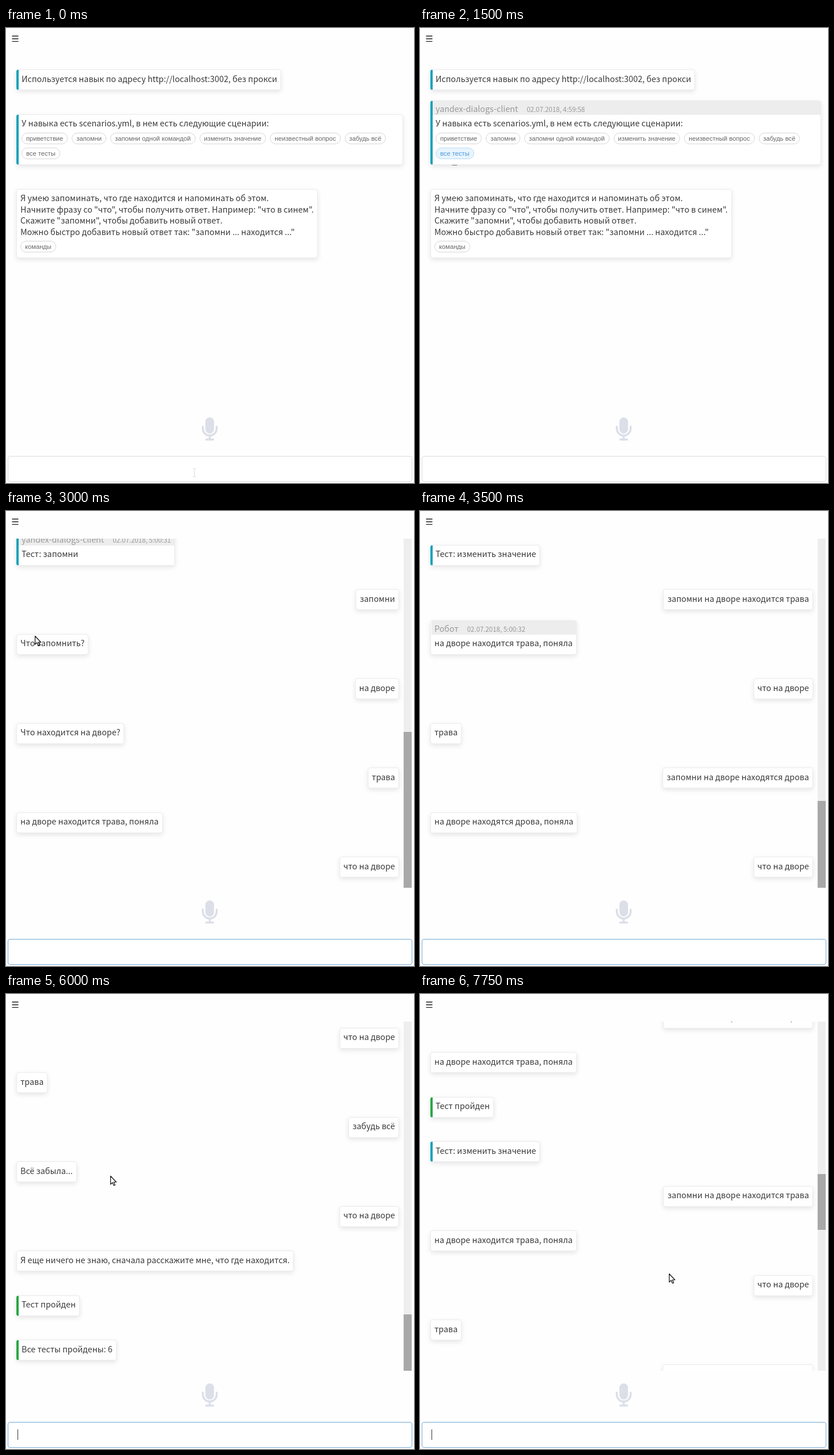
These frames come from a looping animation (708x791 px, 8000 ms). An HTML page:

```html
<!DOCTYPE html>
<html lang="ru">
<head>
<meta charset="utf-8">
<style>
html, body { margin: 0; width: 100%; height: 100%; overflow: hidden; background: #fefefe; }
body { position: relative; color: #3a3a3a; font: 14.3px/19.5px "Noto Sans CJK JP", "Noto Sans CJK SC", "Noto Sans CJK", "Noto Sans", sans-serif; }
#view { position: absolute; left: 0; top: 48px; width: 708px; height: 607px; overflow: hidden; }
#list { position: absolute; left: 0; top: 0; width: 708px; }
.msg { position: absolute; left: 18px; box-sizing: border-box; padding: 4.5px 6px 10px; white-space: pre;
  background: #fff; border: 1px solid #ececef; border-radius: 4px; box-shadow: 0 3px 9px rgba(0,0,0,.1); }
.user { left: auto; right: 26px; }
.info, .ok { border-left: 4px solid #17a2b8; padding-left: 5px; }
.ok { border-left-color: #28a745; }
.head { display: none; height: 24px; line-height: 25px; margin: -4.5px -6px 4.5px 0; padding-right: 6px;
  color: #999; background: #ededed; box-shadow: -5px 0 #ededed; }
.head small { font-size: 11.45px; margin-left: 15px; }
.hover { z-index: 1; }
.hover .head { display: block; }
.wide { width: 671px; }
.wide.hover { width: 678px; }
.chips { display: flex; flex-wrap: wrap; gap: 6.5px 7px; margin: 7px 0 -1px; }
.chips span { height: 18px; padding: 0 7px; border: 1px solid #d6d6da; border-radius: 10px; color: #666;
  font: 11.2px/18px "Liberation Sans", Arial, sans-serif; }
.chips .lit { color: #4a98dc; background: #e8f4fd; border-color: #b9dbf5; }
#bar, #thumb { position: absolute; left: 690px; width: 14px; }
#bar { top: 0; height: 607px; background: #eee; }
#thumb { background: #a8a8a8; }
#input { position: absolute; left: 3px; top: 744px; width: 700px; height: 43px; border: 1px solid #dcdcdf; border-radius: 4px; background: #fff; }
#input.focus { border-color: #74a9d8; }
#caret { position: absolute; left: 20px; top: 757px; width: 1px; height: 18px; background: #333; }
svg { position: absolute; left: 0; top: 0; }
</style>
</head>
<body>
<div id="view"><div id="list"></div><div id="bar"></div><div id="thumb"></div></div>
<div id="input"></div>
<div id="caret"></div>
<svg width="708" height="791" fill="none">
  <path d="M10.5 14h11M10.5 18.7h11M10.5 23.4h11" stroke="#222" stroke-width="1.4"/>
  <g stroke="#dcdfe8" stroke-width="3.4" stroke-linecap="round">
    <rect x="346" y="677" width="15" height="28" rx="7.5" fill="#dcdfe8" stroke="none"/>
    <path d="M341.5 693v3.5a12 12 0 0 0 24 0V693M353.5 709v6M347.5 715.5h12"/>
  </g>
  <g id="pointer" stroke="#111" stroke-width="1.2" stroke-linejoin="round">
    <path id="beam" d="M-3-7h2.5l.5 1 .5-1H3M0-6V6M-3 7h2.5l.5-1 .5 1H3" stroke="#dedee2"/>
    <path id="arrow" d="M.5.5v14.4l3.3-3.1 2.3 5.2 2.2-1-2.3-5h4.4z" fill="#fff"/>
    <path id="hand" d="M-1.5 12V2a1.5 1.5 0 0 1 3 0v5.5q1.5-1.5 3 .4 1.6-1.2 2.7.5 2-.8 2.3 1.4v5q0 2-1.5 3.5v2.5H0v-2l-5-6.5q-1.4-2 0-2.5 1.500-.5 3.500 2.200zM2 7.500v3.500M4.600 8v3M7.200 8.500v2.500" fill="#fff"/>
  </g>
</svg>
<script>
const $ = id => document.getElementById(id);
const VIEW = 607, LOOP = 8000, STEP = 250;

const help = `Я умею запоминать, что где находится и напоминать об этом.
Начните фразу со "что", чтобы получить ответ. Например: "что в синем".
Скажите "запомни", чтобы добавить новый ответ.
Можно быстро добавить новый ответ так: "запомни ... находится ..."`;
const tests = ['приветствие', 'запомни', 'запомни одной командой', 'изменить значение', 'неизвестный вопрос', 'забудь всё'];

// Prefixes: > user, # info, + success
const ask = '>что на дворе', grass = 'на дворе находится трава, поняла';
const learn = ['>запомни на дворе находится трава', grass];
const recall = [ask, 'трава'];
const dialogs = [
  ['>привет', help],
  ['>запомни', 'Что запомнить?', '>на дворе', 'Что находится на дворе?', '>трава', grass, ...recall],
  learn,
  [...learn, ...recall, '>запомни на дворе находятся дрова', 'на дворе находятся дрова, поняла', ask, 'дрова'],
  ['>что там где сам не знаю где', 'Я не знаю'],
  [...learn, ...recall, '>забудь всё', 'Всё забыла...', ask, 'Я еще ничего не знаю, сначала расскажите мне, что где находится.']
];
const lines = [
  '#Используется навык по адресу http://localhost:3002, без прокси',
  '#У навыка есть scenarios.yml, в нем есть следующие сценарии:',
  help,
  ...dialogs.flatMap((d, i) => ['#Тест: ' + tests[i], ...d, '+Тест пройден']),
  '+Все тесты пройдены: 6'
];
const chips = { 1: [...tests, 'все тесты'], 2: ['команды'] };
const kinds = { '>': 'user', '#': 'info', '+': 'ok' };

function add(parent, tag, cls, text = '') {
  const el = parent.appendChild(document.createElement(tag));
  el.className = cls;
  el.textContent = text;
  return el;
}

function clock(i) {
  if (i < 3) return i < 2 ? '4:59:58' : '4:59:59';
  return i < 16 ? '5:00:31' : '5:00:32';
}

let y = 24;
const messages = lines.map((line, i) => {
  const kind = kinds[line[0]] || '';
  const el = add($('list'), 'div', 'msg ' + kind);
  const named = kind === 'info' || kind === 'ok';
  const head = add(el, 'div', 'head', named ? 'yandex-dialogs-client' : 'Робот');
  add(head, 'small', '', '02.07.2018, ' + clock(i));
  add(el, 'div', '', kind ? line.slice(1) : line);
  if (i === 1) el.classList.add('wide');
  if (chips[i]) {
    const row = add(el, 'div', 'chips');
    chips[i].forEach(name => add(row, 'span', '', name));
  }
  const msg = { el, top: y, bottom: y + el.getBoundingClientRect().height };
  y = msg.bottom + 41.5;
  return msg;
});
const allTests = messages[1].el.querySelector('.chips').lastChild;

// Pointer: time, x, y, shape
const path = [
  [0, 327, 773, 'beam'], [250, 300, 700, 'arrow'], [500, 230, 570, 'arrow'], [750, 160, 450, 'arrow'],
  [1000, 100, 340, 'arrow'], [1250, 53, 215, 'hand'], [1500, 56, 217, 'hand'], [2500, 50, 217, 'arrow'],
  [5750, 110, 265, 'arrow'], [6000, 181, 316, 'arrow'], [6250, 320, 420, 'arrow'],
  [6500, 433, 487, 'arrow'], [7250, 432, 486, 'arrow']
];

function lastShown(t) {
  if (t < 2500) return 2;
  const n = 14 + (t - 3000) / STEP * (t < 3000 ? 5 : 7);
  return Math.min(n, messages.length - 1);
}

function hovered(t, last) {
  if (t === 1000) return 2;
  if (t >= 1250 && t < 2500) return 1;
  if (t === 3000) return 7;
  return t > 3000 && t <= 4000 ? last - 5 : -1;
}

function draw(t) {
  const last = lastShown(t), hover = hovered(t, last);
  const height = messages[last].bottom + 18;
  const back = t < 6500 ? 0 : 178 + (t - 6500) / STEP * 267.4;
  const scroll = Math.max(0, height - VIEW - back);
  const overflow = height > VIEW;

  messages.forEach(({ el, top }, i) => {
    el.style.display = i <= last ? '' : 'none';
    el.style.top = top - (i === hover ? 24 : 0) + 'px';
    el.classList.toggle('hover', i === hover);
  });
  $('list').style.top = -scroll + 'px';
  $('bar').hidden = $('thumb').hidden = !overflow;
  $('thumb').style.top = scroll / height * VIEW + 'px';
  $('thumb').style.height = VIEW * VIEW / height + 'px';

  allTests.className = t >= 1250 && t < 2500 ? 'lit' : '';
  $('input').className = t >= 2500 ? 'focus' : '';
  $('caret').hidden = t < 4500 || (t >= 5250 && Math.floor((t - 5250) / 500) % 2 === 0);

  const [, px, py, shape] = path.findLast(p => p[0] <= t);
  $('pointer').setAttribute('transform', `translate(${px} ${py})`);
  for (const id of ['beam', 'arrow', 'hand']) $(id).style.display = id === shape ? '' : 'none';
}

const start = performance.now();
function tick() {
  const t = (performance.now() - start) % LOOP;
  draw(Math.floor(t / STEP) * STEP);
  requestAnimationFrame(tick);
}
tick();
</script>
</body>
</html>
```
